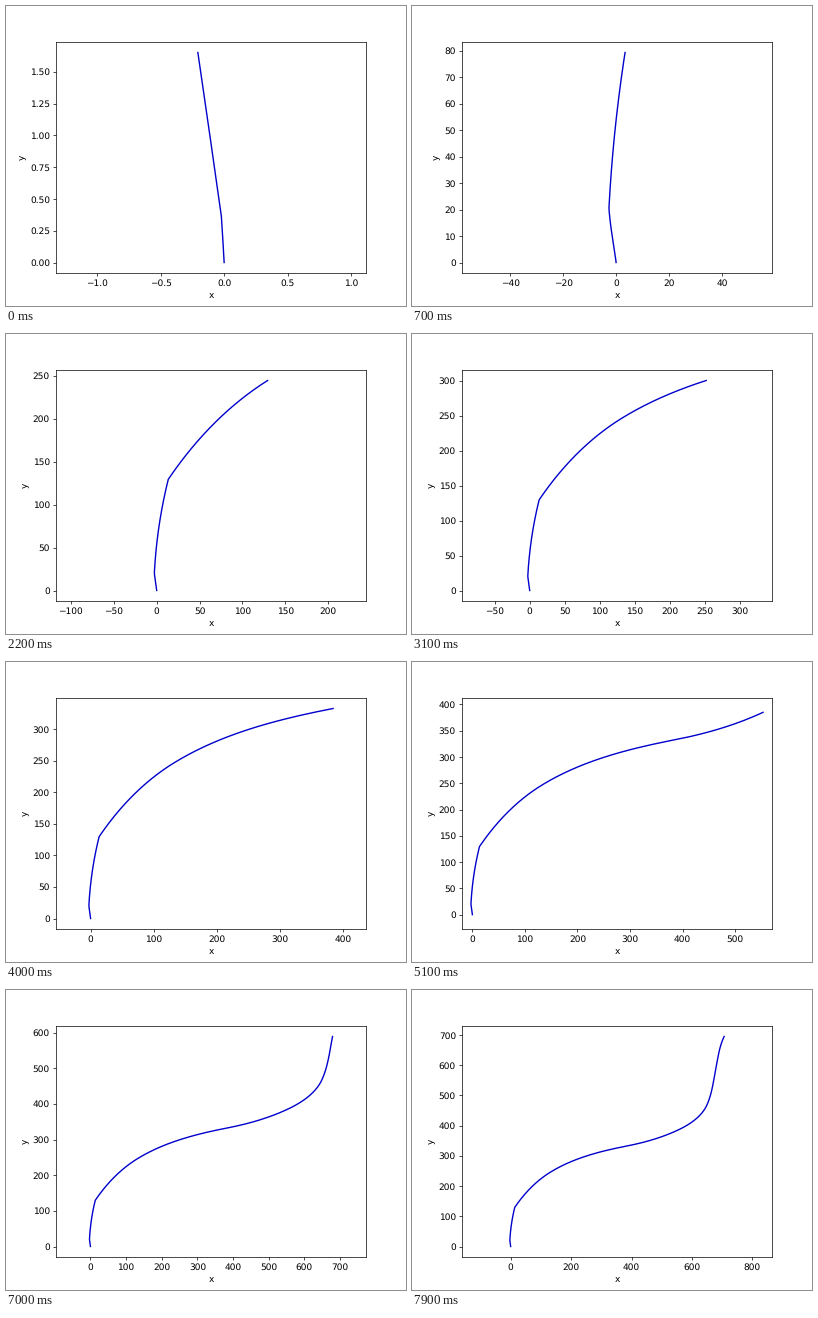
A matplotlib script for the animation above (8 s loop, 400 by 300 pixels).

```python
import numpy as np
import matplotlib.pyplot as plt
from matplotlib.animation import FuncAnimation

FRAMES = 80
BOX = np.array([310, 231])  # axes size in pixels
MARGIN = 1.1

# way points: time in frames, x, y, heading in and heading out in degrees
WAY = np.array([
    (-.3, 0, 0, 93, 93),
    (-.18, -.02, .35, 93, 98),
    (2.6, -2.7, 20.5, 94, 87),
    (10.8, 13.5, 129.5, 76, 56),
    (22, 129.3, 244.7, 32, 32),
    (40, 384, 332.5, 11, 11),
    (51, 553, 385, 25, 25),
    (60.5, 646, 461, 61, 63),
    (70, 679, 589, 79, 79),
    (79, 706.5, 695, 64, 64),
])
TIME, POINT = WAY[:, 0], WAY[:, 1:3]


def heading(deg):
    return np.column_stack([np.cos(np.radians(deg)), np.sin(np.radians(deg))])


def position(t):
    """Points of the drive at times t, on Hermite curves between way points."""
    k = np.clip(np.searchsorted(TIME, t) - 1, 0, len(TIME) - 2)
    u = ((t - TIME[k]) / (TIME[k + 1] - TIME[k]))[:, None]
    a, b = POINT[k], POINT[k + 1]
    chord = np.linalg.norm(b - a, axis=1)[:, None]
    leave, arrive = heading(WAY[k, 4]), heading(WAY[k + 1, 3])
    ease = u * u * (3 - 2 * u)
    bend = u * (1 - u) ** 2 * leave - u * u * (1 - u) * arrive
    return a + ease * (b - a) + chord * bend


plt.rcParams["text.hinting"] = "none"
plt.rcParams["text.hinting_factor"] = 1
fig, ax = plt.subplots(figsize=(6.4, 4.8), dpi=62.5)
line, = ax.plot([], [], color="#0000cc", lw=1.6)
ax.set_xlabel("x")
ax.set_ylabel("y")


def draw(i):
    path = position(np.linspace(TIME[0], i, 1000))
    line.set_data(path.T)

    # equal units on both axes, centred on the data
    low, high = path.min(axis=0), path.max(axis=0)
    unit_x, unit_y = MARGIN * (high - low) / BOX
    unit = max(unit_y, (unit_x + unit_y) / 2)
    mid, half = (low + high) / 2, unit * BOX / 2
    ax.set_xlim(mid[0] - half[0], mid[0] + half[0])
    ax.set_ylim(mid[1] - half[1], mid[1] + half[1])
    return line,


anim = FuncAnimation(fig, draw, frames=FRAMES, interval=100, repeat=True,
                     repeat_delay=0, blit=False)
plt.show()
```
